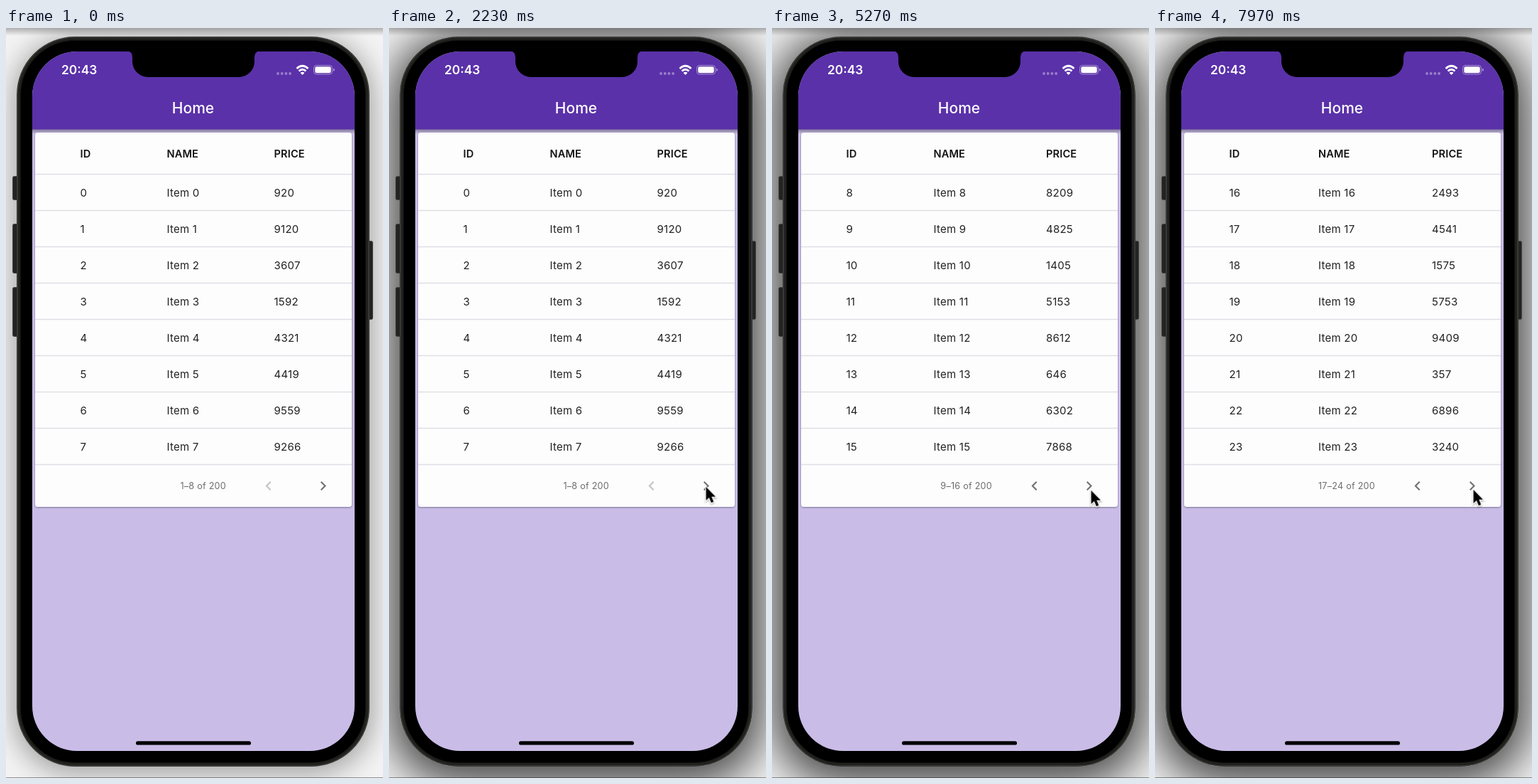
An HTML page for the animation above (8 s loop, 531 by 1054 pixels).

```html
<!DOCTYPE html>
<html lang="en">
<head>
<meta charset="utf-8">
<title>Home</title>
<style>
  html, body { margin: 0; width: 100%; height: 100%; overflow: hidden; background: #f3f3f3; }
  #stage { position: relative; width: 531px; height: 1054px; overflow: hidden; background: #f3f3f3; }
  .shadow, .phone { position: absolute; left: 15px; top: 12px; width: 497px; height: 1026px; border-radius: 82px; }
  .shadow { animation: focus 8s step-end infinite; }
  .edge { position: absolute; inset: 0;
    background: linear-gradient(rgba(0, 0, 0, .28), transparent 11px),
                linear-gradient(0deg, rgba(0, 0, 0, .4) 1px, transparent 1px); }
  .phone { box-sizing: border-box; background: #000; border: 2px solid #393a36;
    box-shadow: inset 0 0 0 3px #20211e, inset 0 0 0 4px #11120f; }
  svg { position: absolute; left: 0; top: 0; }
  text { font-family: Inter, "Liberation Sans", Arial, sans-serif; font-size: 15px; letter-spacing: .25px; fill: #222; }
  .head { font-size: 14.6px; font-weight: 600; letter-spacing: .15px; fill: #111; }
  .count { font-size: 12.6px; fill: #6d6d6d; text-anchor: end; }
  .time { font-size: 17.3px; font-weight: 600; letter-spacing: 0; fill: #fff; }
  .title { font-size: 21px; font-weight: 500; letter-spacing: 0; fill: #fff; text-anchor: middle; }
  .chevron { fill: none; stroke: #707070; stroke-width: 2.1; }
  .off { stroke: #c3c3c3; }

  .page { visibility: hidden; animation: 8s step-end infinite; }
  #page0 { animation-name: first; }
  #page1 { animation-name: second; }
  #page2 { animation-name: third; }
  .pointer { animation: move 8s ease-in-out infinite; }
  .ring { animation: press 8s step-end infinite; }

  @keyframes focus {
    0% { box-shadow: 0 6px 36px 6px rgba(0, 0, 0, .32) }
    21.9%, 100% { box-shadow: 0 10px 60px 16px rgba(0, 0, 0, .7) }
  }
  @keyframes first { 0% { visibility: visible } 34.2%, 100% { visibility: hidden } }
  @keyframes second { 0% { visibility: hidden } 34.2% { visibility: visible } 86.4%, 100% { visibility: hidden } }
  @keyframes third { 0% { visibility: hidden } 86.4%, 100% { visibility: visible } }
  @keyframes move {
    0%, 9% { transform: translate(560px, 760px) }
    18%, 50% { transform: translate(446px, 644px) }
    54%, 76% { transform: translate(449px, 649px) }
    80%, 100% { transform: translate(448px, 648px) }
  }
  @keyframes press {
    0% { opacity: 0 }
    20.2% { opacity: 1 }
    22% { opacity: 0 }
    32.6% { opacity: 1 }
    34.2% { opacity: 0 }
    84.6% { opacity: 1 }
    86.3%, 100% { opacity: 0 }
  }
</style>
</head>
<body>
<div id="stage">
  <div class="shadow"></div>
  <div class="edge"></div>
  <svg width="531" height="1054">
    <g fill="#222322" stroke="#484946">
      <rect x="9.5" y="208.5" width="8" height="33" rx="2"/>
      <rect x="9.5" y="275.5" width="8" height="69" rx="2"/>
      <rect x="9.5" y="364.5" width="8" height="69" rx="2"/>
      <rect x="509.5" y="299.5" width="7" height="110" rx="2"/>
    </g>
  </svg>
  <div class="phone"></div>
  <svg width="531" height="1054">
    <defs>
      <clipPath id="screen"><rect x="37" y="33" width="454" height="983" rx="63"/></clipPath>
      <linearGradient id="fade" x2="0" y2="1">
        <stop stop-color="#000" stop-opacity=".36"/>
        <stop offset="1" stop-color="#000" stop-opacity="0"/>
      </linearGradient>
      <filter id="lift" x="-5%" y="-5%" width="110%" height="110%">
        <feDropShadow dx="0" dy="1" stdDeviation="1" flood-opacity=".38"/>
      </filter>
      <filter id="soft" x="-50%" y="-50%" width="200%" height="200%">
        <feDropShadow dx="0" dy="1.5" stdDeviation="1.2" flood-opacity=".35"/>
      </filter>
    </defs>
    <g clip-path="url(#screen)">
      <rect x="37" y="33" width="454" height="983" fill="#c9bce7"/>
      <rect x="37" y="142" width="454" height="7" fill="url(#fade)"/>
      <rect x="37" y="33" width="454" height="109.5" fill="#5a31a9"/>
    </g>
    <path d="M171 32.5Q178 33 178 41V47A22 22 0 0 0 200 69H328A22 22 0 0 0 350 47V41Q350 33 357 32.5Z"/>
    <text class="time" x="78" y="65">20:43</text>
    <text class="title" x="263.5" y="120">Home</text>

    <g fill="#fff" opacity=".38">
      <circle cx="383" cy="64" r="1.9"/><circle cx="388.7" cy="64" r="1.9"/>
      <circle cx="394.4" cy="64" r="1.9"/><circle cx="400.1" cy="64" r="1.9"/>
    </g>
    <g fill="none" stroke="#fff" stroke-width="2.7">
      <path d="M409.5 57Q417.5 49.5 425.5 57"/>
      <path d="M412.5 60.5Q417.5 56 422.5 60.5"/>
    </g>
    <path d="M414.5 63Q417.5 60.5 420.5 63L417.5 66Z" fill="#fff"/>
    <rect x="433.5" y="52.5" width="26" height="12.5" rx="3.8" fill="none" stroke="#fff" stroke-opacity=".45"/>
    <rect x="435.3" y="54.3" width="22.4" height="8.9" rx="2.2" fill="#fff"/>
    <path d="M461 56.5Q463 57.2 463 58.8T461 61Z" fill="#fff" opacity=".5"/>

    <rect x="41" y="147" width="446" height="526" rx="4" fill="#fdfdfd" filter="url(#lift)"/>
    <path id="rules" stroke="#e0dee5" stroke-width="1.5"/>
    <g id="pages"></g>
    <path class="chevron" d="M443.7 637.7L449.5 643.5L443.7 649.3"/>
    <rect x="183" y="1002.3" width="162" height="5.2" rx="2.6"/>

    <g class="pointer">
      <g class="ring" fill="none">
        <circle cy="2" r="30.3" stroke="#fff" stroke-width="4"/>
        <circle cy="2" r="30" stroke="#000" stroke-width="2"/>
      </g>
      <path d="M0 0V20.5L4.7 16.2L8 24L11.7 22.4L8.4 14.8H14.7Z" transform="translate(.5 1) scale(.92)"
        stroke="#fff" stroke-width="2.4" paint-order="stroke" filter="url(#soft)"/>
    </g>
  </svg>
</div>
<script>
  const pages = [
    { name: 226.5, price: 377.5, prices: [920, 9120, 3607, 1592, 4321, 4419, 9559, 9266] },
    { name: 227.5, price: 386, prices: [8209, 4825, 1405, 5153, 8612, 646, 6302, 7868] },
    { name: 230, price: 390, prices: [2493, 4541, 1575, 5753, 9409, 357, 6896, 3240] }
  ];
  const text = (x, y, value, type = '') => `<text class="${type}" x="${x}" y="${y}">${value}</text>`;
  const row = (page, y, cells, type) =>
    [104.5, page.name, page.price].map((x, i) => text(x, y, cells[i], type)).join('');

  document.getElementById('rules').setAttribute('d',
    Array.from({ length: 9 }, (_, i) => `M41 ${205.5 + i * 51}H487`).join(''));

  document.getElementById('pages').innerHTML = pages.map((page, n) => {
    const start = n * 8;
    const rows = page.prices.map((price, i) =>
      row(page, 236.5 + i * 51, [start + i, `Item ${start + i}`, price]));
    return `<g class="page" id="page${n}">
      ${row(page, 181.5, ['ID', 'NAME', 'PRICE'], 'head')}${rows.join('')}
      ${text(310, 648, `${start + 1}–${start + 8} of 200`, 'count')}
      <path class="chevron ${n ? '' : 'off'}" d="M372.7 637.7L366.9 643.5L372.7 649.3"/>
    </g>`;
  }).join('');
</script>
</body>
</html>
```
